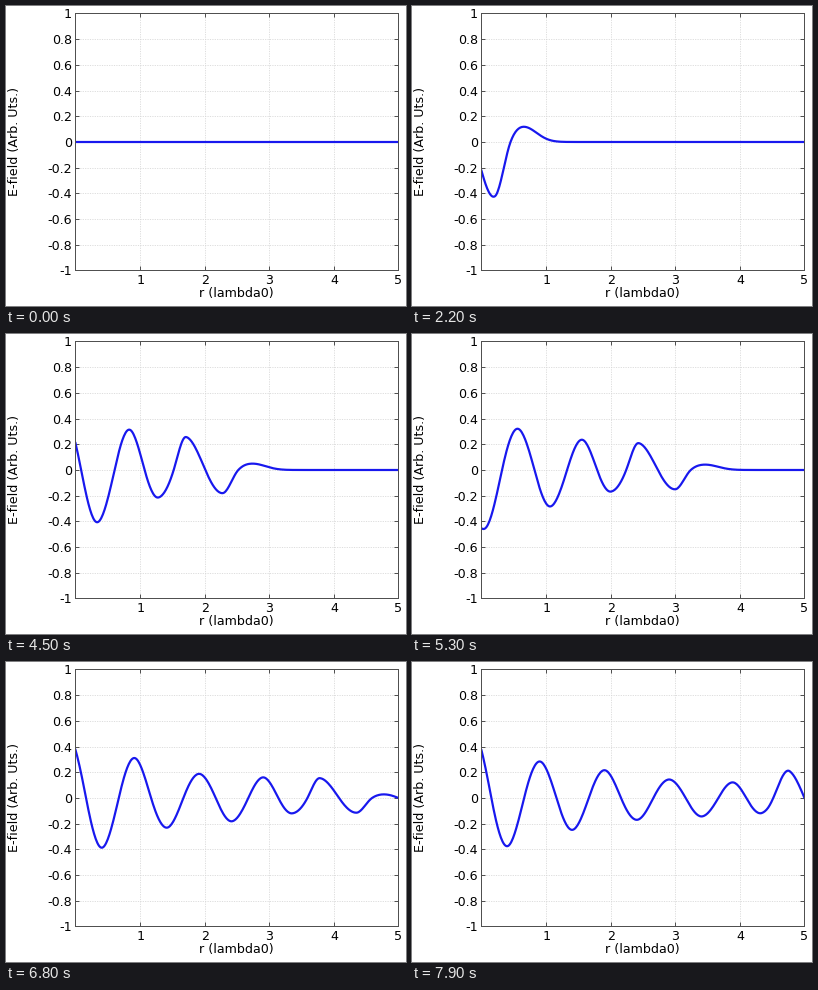
Write a matplotlib script that moves like this. It is 400 px wide and 300 px high and loops after 8000 ms.

```python
import numpy as np
import matplotlib.pyplot as plt
from matplotlib.animation import FuncAnimation

W, H, DPI = 400, 300, 100
PX = 72 / DPI              # one pixel in points
FRAMES, INTERVAL = 80, 100
STEP = 0.09                # distance travelled per frame, in wavelengths
WALL = 5.0                 # reflecting boundary
SPREAD = 1.33              # offset of the 1/r decay

# Emitted signal: extrema, zero crossings and lobe heights
PEAKS = np.r_[1.30, 1.77, 2.34, 2.77, 3.21, np.arange(3.7, 7.3, 0.5)]
ZEROS = np.r_[1.53, 2.04, 2.53, 2.98, 3.445, np.arange(3.95, 7.1, 0.5)]
FAR = np.array([.20, .65, .79, .56, .68, .68, .61, .635, .70, .68, .635, .65, .67])
NEAR = np.array([.30, .65, .665, .555, .68, .68, .605, .63, .695, .67, .635, .65, .67])
SIGNS = (-1.0) ** np.arange(len(PEAKS))


def signal(u, heights):
    """Smooth onset followed by a cubic curve through the peaks and zeros."""
    n = len(PEAKS)
    x, y, m = np.zeros((3, 2 * n - 1))
    x[::2], x[1::2] = PEAKS, ZEROS
    y[::2] = heights * SIGNS
    slope = np.diff(y) / np.diff(x)
    a, b = slope[::2], slope[1::2]
    m[1::2] = np.pi * a * b / (a + b)

    i = np.clip(np.searchsorted(x, u) - 1, 0, len(x) - 2)
    h = x[i + 1] - x[i]
    t = np.clip((u - x[i]) / h, 0, 1)
    s = 1 - t
    curve = ((1 + 2 * t) * s**2 * y[i] + t * s**2 * h * m[i]
             + t**2 * (3 - 2 * t) * y[i + 1] - t**2 * s * h * m[i + 1])
    onset = heights[0] * np.exp(-((u - PEAKS[0]) / 0.28) ** 2)
    return np.where(u < PEAKS[0], onset, curve)


def outgoing(r, d):
    u = d - r - 0.025 * np.exp(-8 * r)
    far, near = signal(u, FAR), signal(u, NEAR)
    return (far + (near - far) * np.exp(-1.5 * r)) / (SPREAD + r)


def field(r, d):
    return outgoing(r, d) - outgoing(2 * WALL - r, d)


plt.rcParams.update({"font.family": "DejaVu Sans", "font.size": 12.6 * PX,
                     "axes.unicode_minus": False})
fig = plt.figure(figsize=(W / DPI, H / DPI), dpi=DPI, facecolor="white")
# Just under half pixels, so the frame snaps onto the intended rows
ax = fig.add_axes([69.49 / W, 1 - 264.49 / H, 323 / W, 257 / H])
ax.set(xlim=(0, WALL), ylim=(-1, 1))
ax.set_axisbelow(True)

levels = np.arange(-5, 6) / 5
ax.set_xticks(range(1, 6))
ax.set_yticks(levels, [f"{v:g}" for v in levels])
ax.grid(color="#d6d6d6", linewidth=0.8 * PX, linestyle=(0, (1.5, 1.5)))
ax.tick_params(direction="in", top=True, right=True, length=4 * PX,
               width=0.9 * PX, color="#404040", pad=4 * PX)
ax.tick_params(axis="y", pad=3.5 * PX)
for spine in ax.spines.values():
    spine.set(linewidth=PX, color="#505050")

fig.text(230 / W, 1 - 291.5 / H, "r (lambda0)", ha="center", va="baseline")
fig.text(9 / W, 1 - 136 / H, "E-field (Arb. Uts.)", rotation=90,
         ha="center", va="center")

r = np.linspace(0, WALL, 401)
line, = ax.plot(r, 0 * r, color="#1818ee", linewidth=2.2 * PX, zorder=2.2)


def draw(n):
    line.set_ydata(field(r, STEP * n))
    return line,


anim = FuncAnimation(fig, draw, frames=FRAMES, interval=INTERVAL,
                     init_func=lambda: draw(0), repeat=True, repeat_delay=0)
plt.show()
```
